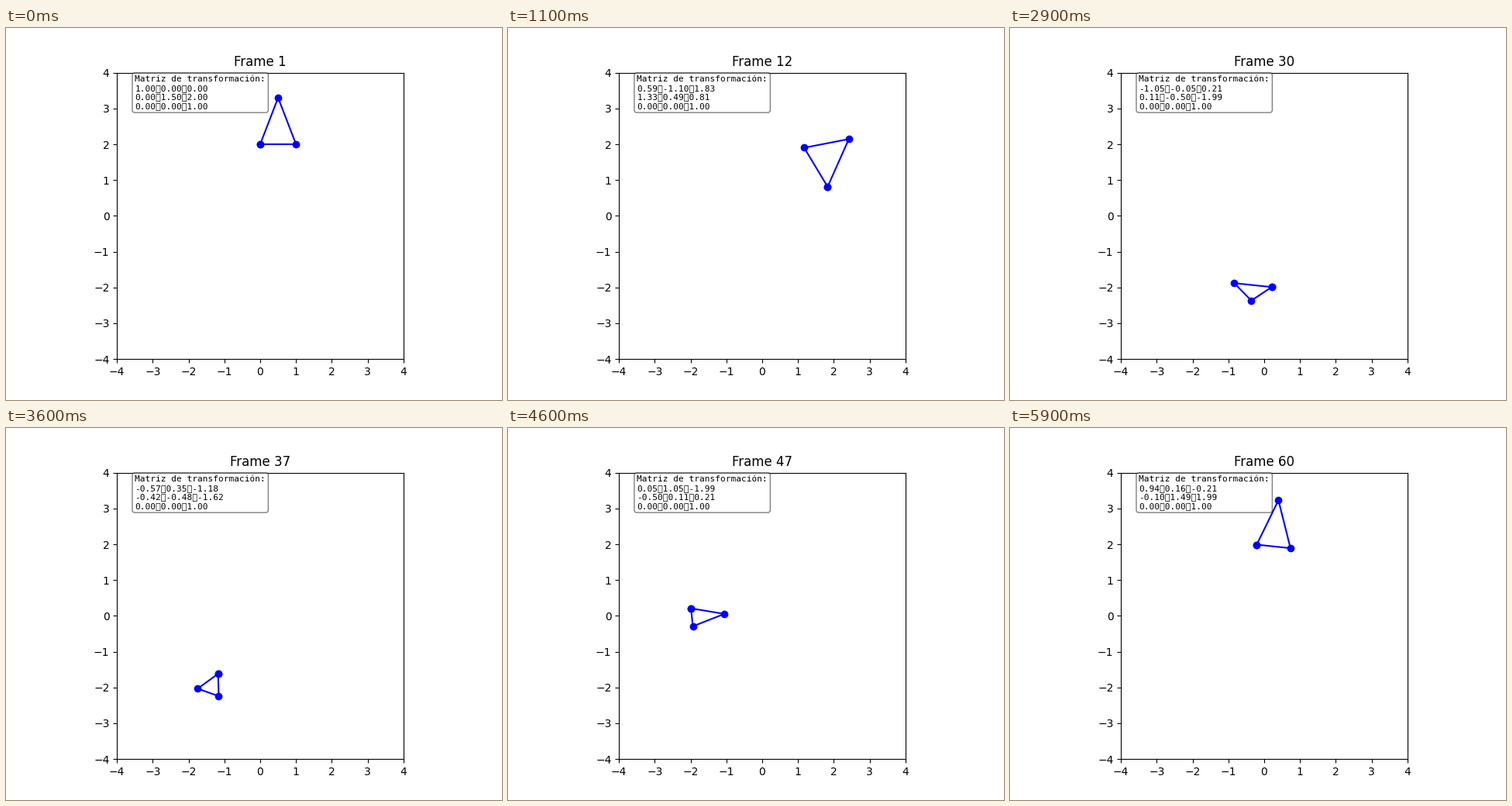
Recreate the animation shown at these times as a matplotlib script. Size 640 px wide and 480 px high, loop 6 s.

```python
import numpy as np
import matplotlib.pyplot as plt
from matplotlib.animation import FuncAnimation

FRAMES = 60
INTERVAL = 100

# Closed equilateral triangle in homogeneous coordinates
TRIANGLE = np.array([
    [0, 1, 0.5, 0],
    [0, 0, np.sqrt(3) / 2, 0],
    [1, 1, 1, 1],
])


def translation(tx, ty):
    return np.array([[1, 0, tx], [0, 1, ty], [0, 0, 1]])


def rotation(angle):
    c, s = np.cos(angle), np.sin(angle)
    return np.array([[c, -s, 0], [s, c, 0], [0, 0, 1]])


def scaling(sx, sy):
    return np.diag([sx, sy, 1])


def transform(angle):
    s, c = np.sin(angle), np.cos(angle)
    return (translation(2 * s, 2 * c)
            @ rotation(angle)
            @ scaling(1 + 0.5 * s, 1 + 0.5 * c))


def matrix_text(matrix):
    # Tabs are drawn as the font's missing-glyph box
    rows = ["\t".join(f"{v:.2f}" for v in row) for row in matrix]
    return "\n".join(["Matriz de transformación:"] + rows)


fig, ax = plt.subplots(figsize=(6.4, 4.8), dpi=100)
ax.set_xlim(-4, 4)
ax.set_ylim(-4, 4)
ax.set_aspect("equal")
line, = ax.plot([], [], "bo-")
label = ax.text(-3.5, 3, "", fontsize=8, family="DejaVu Sans Mono",
                bbox=dict(boxstyle="round", facecolor="white", alpha=0.5))
title = ax.set_title("")


def update(i):
    matrix = transform(2 * np.pi * i / FRAMES)
    x, y, _ = matrix @ TRIANGLE
    line.set_data(x, y)
    label.set_text(matrix_text(matrix))
    title.set_text(f"Frame {i + 1}")
    return line, label, title


anim = FuncAnimation(fig, update, frames=FRAMES, interval=INTERVAL,
                     repeat=True, repeat_delay=0)
plt.show()
```
